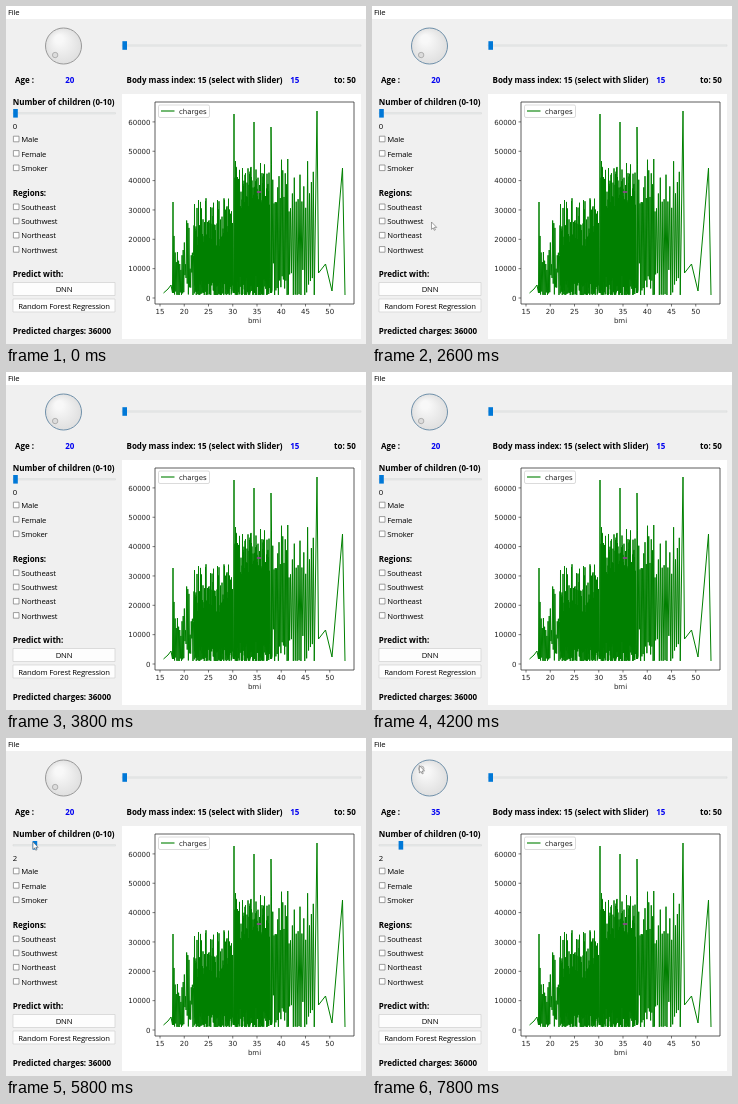
Write an HTML page with a canvas that moves like this. It is 360x338 px and loops after 8 s.

```html
<!DOCTYPE html>
<html lang="en">
<head>
<meta charset="utf-8">
<title>Charges predictor</title>
<style>
html, body { margin: 0; width: 100%; height: 100%; overflow: hidden; background: #f0f0f0; }
canvas { display: block; width: 360px; height: 338px; }
</style>
</head>
<body>
<canvas id="stage"></canvas>
<script>
const W = 360, H = 338, LOOP = 8000, STEP = 200;
const canvas = document.getElementById('stage');
const ctx = canvas.getContext('2d');
const scale = window.devicePixelRatio || 1;
canvas.width = W * scale;
canvas.height = H * scale;

const UI = '7.7px "Open Sans", "Noto Sans", sans-serif';
const BOLD = 'bold 8px "Open Sans", "Noto Sans", sans-serif';
const PLOT = '7px "DejaVu Sans", sans-serif';
const BLUE = '#0078d7', GREEN = '#008000';

function text(str, x, y, font = UI, color = '#000', align = 'left') {
  ctx.font = font;
  ctx.letterSpacing = font === UI ? '-0.18px' : '0px';
  ctx.fillStyle = color;
  ctx.textAlign = align;
  ctx.fillText(str, x, y);
}

function box(x, y, w, h, fill, stroke, lineWidth = 0.7) {
  ctx.fillStyle = fill;
  ctx.fillRect(x, y, w, h);
  if (stroke) {
    ctx.strokeStyle = stroke;
    ctx.lineWidth = lineWidth;
    ctx.strokeRect(x, y, w, h);
  }
}

function line(x1, y1, x2, y2, color, width) {
  ctx.strokeStyle = color;
  ctx.lineWidth = width;
  ctx.beginPath();
  ctx.moveTo(x1, y1);
  ctx.lineTo(x2, y2);
  ctx.stroke();
}

function randomizer(seed) {
  return () => {
    seed = (seed * 1664525 + 1013904223) % 4294967296;
    return seed / 4294967296;
  };
}

// A zigzag in zones of differing density, with a few tall spikes.
function buildCurve() {
  const rnd = randomizer(77);
  const points = [];
  const zone = (from, to, gap, crest, depth, lift) => {
    for (let x = from; x < to; x += gap) {
      points.push([x, crest + depth * rnd()], [x + gap / 2, 289 - lift * rnd() ** 3]);
    }
  };
  const spike = (x, y) => points.push([x - 0.5, 287], [x, y], [x + 0.5, 287]);

  zone(168, 188, 1.15, 214, 60, 25);
  zone(188, 227, 0.5, 190, 52, 16);
  zone(229, 264, 0.5, 153, 50, 20);
  zone(265.5, 284, 1.25, 150, 60, 35);
  zone(284.5, 309, 1.9, 154, 50, 28);
  spike(167, 196);
  spike(228, 108);
  spike(248, 116);
  spike(265, 121);
  points.sort((a, b) => a[0] - b[0]);
  return [[157.5, 287], [162, 283], [165, 279], ...points,
    [311, 105], [312.5, 267], [319.5, 258], [326, 285], [336.5, 162], [339, 289]];
}
const curve = buildCurve();

function drawChart() {
  box(116, 88, 239, 245, '#fff');
  ctx.strokeStyle = GREEN;
  ctx.lineWidth = 1;
  ctx.lineJoin = 'round';
  ctx.beginPath();
  curve.forEach(([x, y]) => ctx.lineTo(x, y));
  ctx.stroke();
  line(250.8, 186, 255.2, 186, '#953f95', 1.6);

  ctx.strokeStyle = '#333';
  ctx.lineWidth = 0.8;
  ctx.strokeRect(149, 96, 199, 202);
  for (let i = 0; i < 8; i++) {
    const x = 154 + i * 24.25;
    line(x, 298, x, 300.5, '#222', 0.6);
    text(String(15 + i * 5), x, 307.5, PLOT, '#222', 'center');
  }
  for (let i = 0; i < 7; i++) {
    const y = 292 - i * 29.35;
    line(146.5, y, 149, y, '#222', 0.6);
    text(String(i * 10000), 144.5, y + 2.6, PLOT, '#222', 'right');
  }
  text('bmi', 248.5, 317, PLOT, '#222', 'center');

  ctx.beginPath();
  ctx.roundRect(152.5, 99, 51, 12.5, 1.5);
  ctx.fillStyle = 'rgba(255,255,255,.85)';
  ctx.fill();
  ctx.strokeStyle = '#ccc';
  ctx.lineWidth = 0.7;
  ctx.stroke();
  line(155, 105, 168.5, 105, GREEN, 1.1);
  text('charges', 173, 107.5, PLOT, '#222');
}

function slider(x, width, y, handle, color) {
  box(x, y - 0.7, width, 1.4, '#e7eaea', '#d6d6d6', 0.5);
  box(handle, y - 4.3, 4.6, 8.6, color);
}

function checkbox(label, y) {
  box(7.4, y - 6, 5.6, 5.6, '#fff', '#777');
  text(label, 15.3, y);
}

function button(label, y, hover) {
  box(7, y, 102, 13, hover ? '#dfeaf2' : '#fdfdfd', hover ? '#8aa5b8' : '#d0d0d0');
  text(label, 58, y + 9.6, UI, '#000', 'center');
}

// The dial spans 300 degrees clockwise for ages 18 to 65.
function notch(age) {
  const a = (240 - (age - 18) * 300 / 47) * Math.PI / 180;
  return [57.5 + 12.3 * Math.cos(a), 40 - 12.3 * Math.sin(a)];
}

function disc(x, y, r, fill, stroke, width) {
  ctx.beginPath();
  ctx.arc(x, y, r, 0, Math.PI * 2);
  ctx.fillStyle = fill;
  ctx.fill();
  ctx.strokeStyle = stroke;
  ctx.lineWidth = width;
  ctx.stroke();
}

function drawDial(age, focused) {
  const g = ctx.createRadialGradient(53, 33, 4, 57.5, 40, 19);
  g.addColorStop(0, '#f8f8f8');
  g.addColorStop(1, '#dedede');
  disc(57.5, 40, 18, g, focused ? '#6f90aa' : '#999', 1);
  const [x, y] = notch(age);
  disc(x, y, 2.7, '#dcdcdc', '#a2a2a2', 0.8);
}

// Stops are time, x, y; the pointer rests after the last one until hidden.
const TO_BUTTON = [[1000, 60, 48], [1600, 46, 96], [2200, 44, 150], [3000, 75, 282]];
const TO_DIAL = [[4600, 9, 104], [5000, 27, 104], [5800, 27, 104], [6600, 46, 46]];

function along(stops, t) {
  const next = stops.findIndex(s => s[0] > t);
  if (next < 0) return stops[stops.length - 1].slice(1);
  const [t0, x0, y0] = stops[next - 1], [t1, x1, y1] = stops[next];
  const k = (t - t0) / (t1 - t0);
  return [x0 + (x1 - x0) * k, y0 + (y1 - y0) * k];
}

function cursorAt(t, age) {
  if (t < 1000 || (t >= 3200 && t < 4600)) return null;
  if (t < 3200) return along(TO_BUTTON, t);
  if (t < 6800) return along(TO_DIAL, t);
  const [x, y] = notch(age);
  return [x - 2, y - 3.2];
}

const ARROW = new Path2D('M0 0V7.4L1.7 5.9L2.8 8.3L3.9 7.8L2.8 5.4H5.2Z');

function drawCursor([x, y]) {
  ctx.save();
  ctx.translate(x, y);
  ctx.fillStyle = '#fff';
  ctx.fill(ARROW);
  ctx.strokeStyle = '#666';
  ctx.lineWidth = 0.6;
  ctx.stroke(ARROW);
  ctx.restore();
}

const clamp = (v, lo, hi) => Math.min(hi, Math.max(lo, v));

function draw(t) {
  const age = Math.round(20 + 15 * clamp((t - 6800) / 1000, 0, 1));
  const children = clamp((t - 4600) / STEP, 0, 2);
  const dragging = t >= 4600 && t < 5600;
  const dialFocused = (t >= 1000 && t < 4600) || t >= 6800;
  const cursor = cursorAt(t, age);

  ctx.setTransform(scale, 0, 0, scale, 0, 0);
  box(0, 0, W, H, '#f0f0f0');
  box(0, 0, W, 13, '#fff');
  text('File', 2, 9.3);

  drawDial(age, dialFocused);
  slider(116, 239, 39.5, 116.4, BLUE);
  text('Age :', 9, 77, BOLD);
  text(String(age), 59.3, 77, BOLD, '#0000f0');
  text('Body mass index: 15 (select with Slider)', 120.5, 77, BOLD);
  text('15', 284.3, 77, BOLD, '#0000f0');
  text('to: 50', 328, 77, BOLD);

  text('Number of children (0-10)', 6.7, 98.8, BOLD);
  slider(7, 102.5, 107.3, 7.2 + children * 9.7, dragging ? '#cccccc' : BLUE);
  text(String(children), 6.8, 123);
  ['Male', 'Female', 'Smoker'].forEach((s, i) => checkbox(s, 136.2 + i * 14.4));
  text('Regions:', 6.7, 189.8, BOLD);
  ['Southeast', 'Southwest', 'Northeast', 'Northwest'].forEach((s, i) => checkbox(s, 204 + i * 14.2));
  text('Predict with:', 6.7, 271.3, BOLD);
  button('DNN', 276.5, t >= 2800 && t < 3200);
  button('Random Forest Regression', 293, false);
  text('Predicted charges: 36000', 6.7, 327.5, BOLD);

  drawChart();
  if (cursor) drawCursor(cursor);
}

function tick() {
  const t = performance.now() % LOOP;
  draw(Math.floor(t / STEP) * STEP);
  requestAnimationFrame(tick);
}
tick();
</script>
</body>
</html>
```
